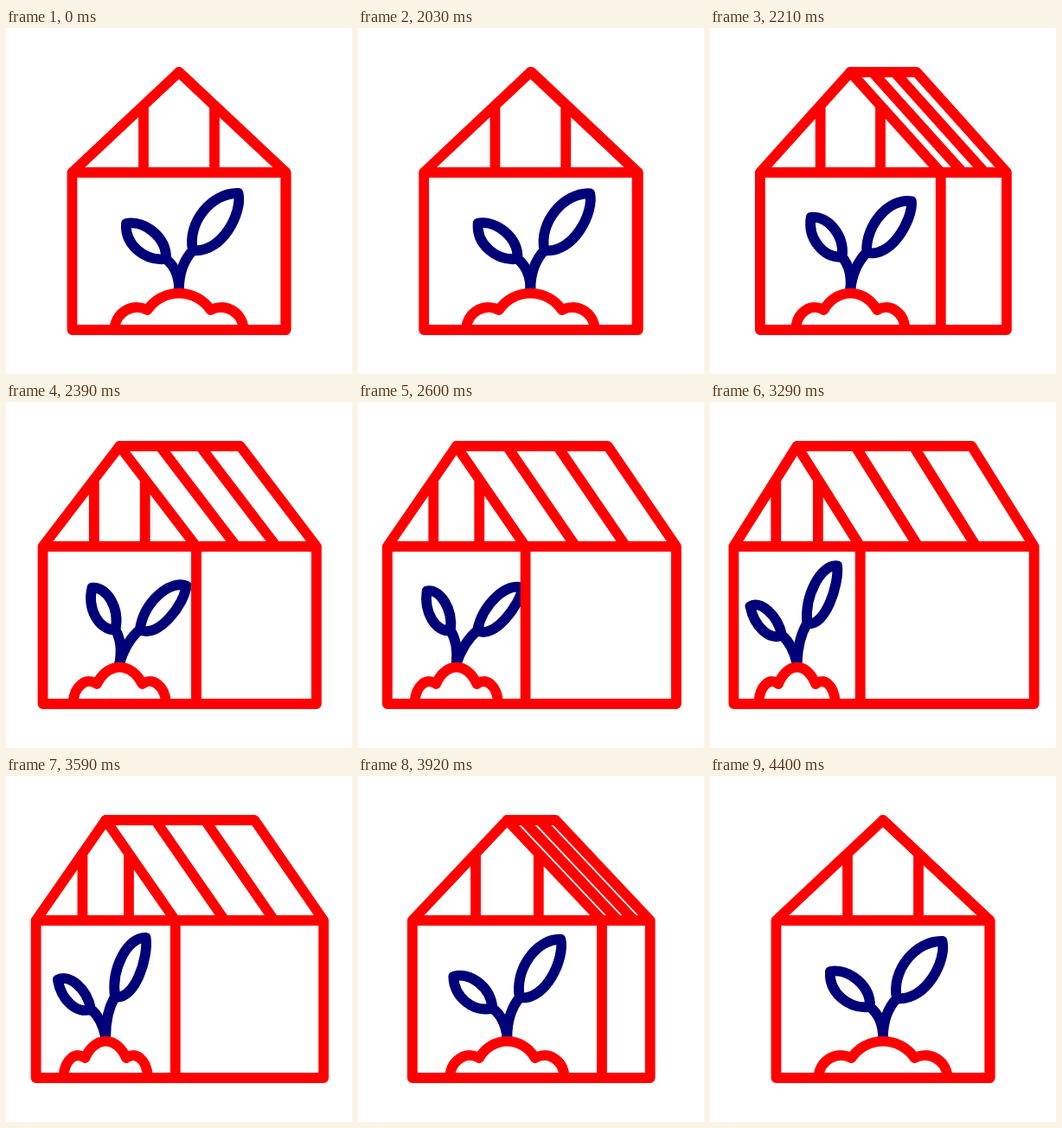
Animation of 400x400 px, one loop 4430 ms. Source, as an HTML page:

```html
<!DOCTYPE html>
<html lang="en">
<head>
<meta charset="utf-8">
<title>Greenhouse</title>
<style>
  html, body { margin: 0; width: 100%; height: 100%; overflow: hidden; background: #fff; }
  svg { display: block; width: 100vw; height: 100vh; }
  path { fill: none; stroke: #f00; stroke-width: 11.8; stroke-linecap: round; stroke-linejoin: round; vector-effect: non-scaling-stroke; }
  .leaf { stroke: #000078; }
</style>
</head>
<body>
<svg viewBox="0 0 400 400">
  <!-- plant and soil are drawn around the root of the stem -->
  <path class="leaf" id="left" d="M0 0C0-14-4-26-15-35C-40-32-63-52-61-76C-40-80-14-60-15-35"/>
  <path class="leaf" id="right" d="M0 0C0-17 4-32 16-45C9-77 38-112 68.500-111C74-90 50-41 16-45"/>
  <path id="soil" d="M-74.500 45A26 26 0 0 1-36.500 24A44 44 0 0 1 36.500 24A26 26 0 0 1 74.500 45"/>
  <path id="side"/>
  <path id="front"/>
</svg>
<script>
const LOOP = 4430, START = 2030;
const TOP = 51, EAVES = 167, FLOOR = 349, ROOT = 302;
const el = id => document.getElementById(id);
const mix = (a, b, k) => a + (b - a) * k;

function bezier(x1, x2) {
  const at = (a, b, s) => 3 * a * s * (1 - s) ** 2 + 3 * b * s * s * (1 - s) + s ** 3;
  return x => {
    let lo = 0, hi = 1;
    for (let i = 0; i < 24; i++) {
      const s = (lo + hi) / 2;
      if (at(x1, x2, s) < x) lo = s; else hi = s;
    }
    return at(0, 1, lo);
  };
}

const opening = bezier(0.2, 0.06);
const closing = bezier(0.61, 0.4);
const smooth = k => k * k * (3 - 2 * k);

// keys: [time, angle, stretch]
const swayLeft = [[2000, 0, 1], [2400, 10, 1.06], [3100, -14, 1.03], [3350, -14, 1.01], [4400, 0, 1]];
const swayRight = [[2000, 0, 1], [2520, 20, 0.97], [3500, 0, 1.04], [3920, 0, 1.02], [4400, 0, 1]];

function sway(keys, t) {
  const i = keys.findIndex(k => k[0] > t);
  if (i < 1) return [0, 1];
  const a = keys[i - 1], b = keys[i];
  const k = smooth((t - a[0]) / (b[0] - a[0]));
  return [mix(a[1], b[1], k), mix(a[2], b[2], k)];
}

function openness(t) {
  if (t < START || t >= 4400) return 0;
  return t < 3200 ? opening((t - 2000) / 1200) : 1 - closing((t - 3200) / 1200);
}

function place(id, x, sx, [angle, stretch] = [0, 1]) {
  el(id).setAttribute('transform',
    `translate(${x} ${ROOT}) rotate(${angle}) scale(${sx * stretch} ${stretch})`);
}

function draw(t) {
  const d = openness(t);
  const sx = 1 - 0.41 * d, apex = 200 - 100 * d;
  const l = apex - 123.5 * sx, m = apex + 123.5 * sx;
  const r = 323.5 + 51.5 * d, ridge = 200 + 103 * d;
  const now = t < START ? 0 : t;

  place('left', apex, sx, sway(swayLeft, now));
  place('right', apex, sx, sway(swayRight, now));
  place('soil', apex, sx);

  const post = x => `M${apex + x * sx} 92V${EAVES}`;
  el('front').setAttribute('d',
    `M${l} ${EAVES}L${apex} ${TOP}L${m} ${EAVES}V${FLOOR}H${l}V${EAVES}H${m}` + post(-41) + post(41));

  const bar = k => `M${mix(apex, ridge, k)} ${TOP}L${mix(m, r, k)} ${EAVES}`;
  el('side').setAttribute('d',
    `M${apex} ${TOP}H${ridge}L${r} ${EAVES}V${FLOOR}H${m}M${m} ${EAVES}H${r}` + bar(1 / 3) + bar(2 / 3));
}

const begin = performance.now();
function tick() {
  draw((performance.now() - begin) % LOOP);
  requestAnimationFrame(tick);
}
tick();
</script>
</body>
</html>
```
